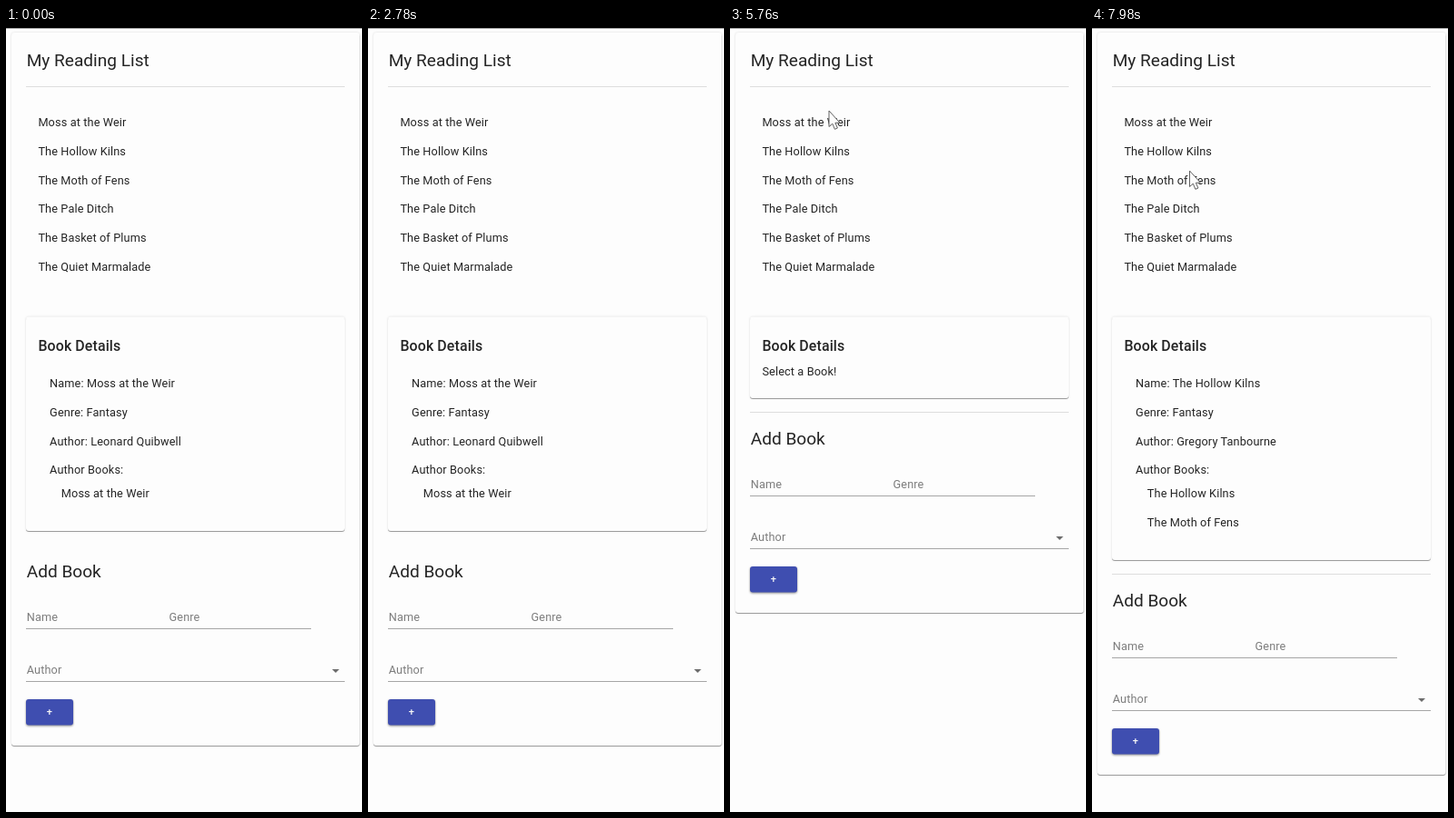
An HTML page for the animation above (8000 ms loop, 392 px wide and 862 px high).

```html
<!DOCTYPE html>
<html lang="en">
<head>
<meta charset="utf-8">
<title>My Reading List</title>
<style>
  html, body { margin: 0; width: 100%; height: 100%; overflow: hidden; background: #fdfdfd; }
  svg { display: block; width: 392px; height: 862px; }
  text { font: 12.72px Roboto, sans-serif; letter-spacing: .12px; fill: #242424; white-space: pre; }
  .heading { font-size: 19.08px; letter-spacing: 0; }
  .subheading { font-size: 15.9px; font-weight: 500; }
  .label { fill: #7e7e7e; }
  .plus { font-size: 11.1px; font-weight: 500; fill: #f6f6f6; text-anchor: middle; }
  .status { font: 12.6px "Noto Sans", sans-serif; letter-spacing: 0; fill: #717171; }
  .card {
    fill: #fdfdfd;
    filter: drop-shadow(0 1.2px .4px rgba(0, 0, 0, .34)) drop-shadow(0 .6px .8px rgba(0, 0, 0, .14));
  }
  .button { fill: #3f4eb0; filter: drop-shadow(0 1.4px 1.1px rgba(0, 0, 0, .45)); }
  .divider { fill: #dedede; }
  .underline { fill: #a6a6a6; }
</style>
</head>
<body>
<svg viewBox="0 0 392 862">
  <g id="page"></g>
  <g id="status">
    <rect x="-5" y="845.5" width="134.5" height="30" rx="4" fill="#fdfdfd" stroke="#e2e2e2"/>
    <text class="status" x="5" y="862">Waiting for localh…</text>
  </g>
  <path id="cursor" d="M0 0V17.5L3.8 14.2L6.4 20.3L9.4 19L6.9 13.2H12Z"
        fill="#fdfdfd" stroke="#606060" stroke-linejoin="round"/>
  <rect width="392" height="1" fill="#a8a8a8"/>
</svg>
<script>
const LOOP = 8000;
const COLUMN = [22.7, 35.4, 48.1, 60.8];
const ROW = 31.8;

const titles = ["Moss at the Weir", "The Hollow Kilns", "The Moth of Fens",
  "The Pale Ditch", "The Basket of Plums", "The Quiet Marmalade"];
const firstBook = { title: titles[0], author: "Leonard Quibwell", works: [titles[0]] };
const secondBook = { title: titles[1], author: "Gregory Tanbourne", works: [titles[1], titles[2]] };

const text = (x, y, content, type = "") => `<text class="${type}" x="${x}" y="${y}">${content}</text>`;
const line = (y, type = "divider", width = 351) =>
  `<rect class="${type}" x="22" y="${y}" width="${width}" height="1"/>`;
const card = (x, y, width, bottom) =>
  `<rect class="card" x="${x}" y="${y}" width="${width}" height="${bottom - y}" rx="3.2"/>`;

const header = bottom => card(6, 5, 383.6, bottom) +
  text(COLUMN[0], 42, "My Reading List", "heading") + line(64);

const loadingPage = () => header(168) + text(COLUMN[0], 95, "Loading...") +
  line(116) + text(COLUMN[0], 147, "Loading...");

function details(book) {
  if (!book) return text(COLUMN[1], 382, "Select a Book!");
  const facts = [`Name: ${book.title}`, "Genre: Fantasy", `Author: ${book.author}`, "Author Books:"];
  return facts.map((fact, i) => text(COLUMN[2], 395 + i * ROW, fact)).join("") +
    book.works.map((work, i) => text(COLUMN[3], 516 + i * ROW, work)).join("");
}

const addForm = () =>
  text(COLUMN[0], 604, "Add Book", "heading") +
  text(COLUMN[0], 652, "Name", "label") + text(179.5, 652, "Genre", "label") +
  line(660, "underline", 314) +
  text(COLUMN[0], 710, "Author", "label") +
  `<path d="M359 705h8l-4 4z" fill="#6c6c6c"/>` + line(718, "underline") +
  `<rect class="button" x="22" y="738" width="52" height="28.6" rx="3"/>` +
  text(48, 756, "+", "plus");

function listPage(book) {
  const shift = book ? (book.works.length - 1) * 32 : -146;
  return header(789 + shift) +
    titles.map((title, i) => text(COLUMN[1], 108 + i * ROW, title)).join("") +
    card(22, 317.5, 351, 553 + shift) +
    text(COLUMN[1], 355, "Book Details", "subheading") + details(book) +
    (book === firstBook ? "" : line(568 + shift)) +
    `<g transform="translate(0 ${shift})">${addForm()}</g>`;
}

// Each page stays until its end time.
const pages = [
  [3300, listPage(firstBook)],
  [3900, ""],
  [4080, loadingPage()],
  [5800, listPage(null)],
  [7400, listPage(firstBook)],
  [LOOP, listPage(secondBook)]
];

// Cursor stops: time, x, y.
const stops = [[4720, 373, 66], [4890, 109, 91], [6080, 109, 91], [6340, 107.5, 122],
  [7660, 107.5, 122], [7940, 107.5, 157], [LOOP, 107.5, 157]];

const progress = (t, from, to) => Math.min(1, Math.max(0, (t - from) / (to - from)));
const ease = p => p * p * (3 - 2 * p);

function cursorAt(t) {
  const next = stops.findIndex(stop => t < stop[0]);
  const [t0, x0, y0] = stops[next - 1], [t1, x1, y1] = stops[next];
  const p = ease(progress(t, t0, t1));
  return [x0 + (x1 - x0) * p, y0 + (y1 - y0) * p];
}

const [page, status, cursor] = ["page", "status", "cursor"].map(id => document.getElementById(id));
let shown = null;

function draw(now) {
  const t = now % LOOP;
  const current = pages.find(([end]) => t < end);
  if (current !== shown) {
    page.innerHTML = current[1];
    shown = current;
  }
  status.setAttribute("opacity", progress(t, 3320, 3480) - progress(t, 4250, 4450));
  const visible = t >= stops[0][0];
  cursor.style.display = visible ? "" : "none";
  if (visible) cursor.setAttribute("transform", `translate(${cursorAt(t)})`);
}

const start = performance.now();
function tick() {
  draw(performance.now() - start);
  requestAnimationFrame(tick);
}
tick();
</script>
</body>
</html>
```
